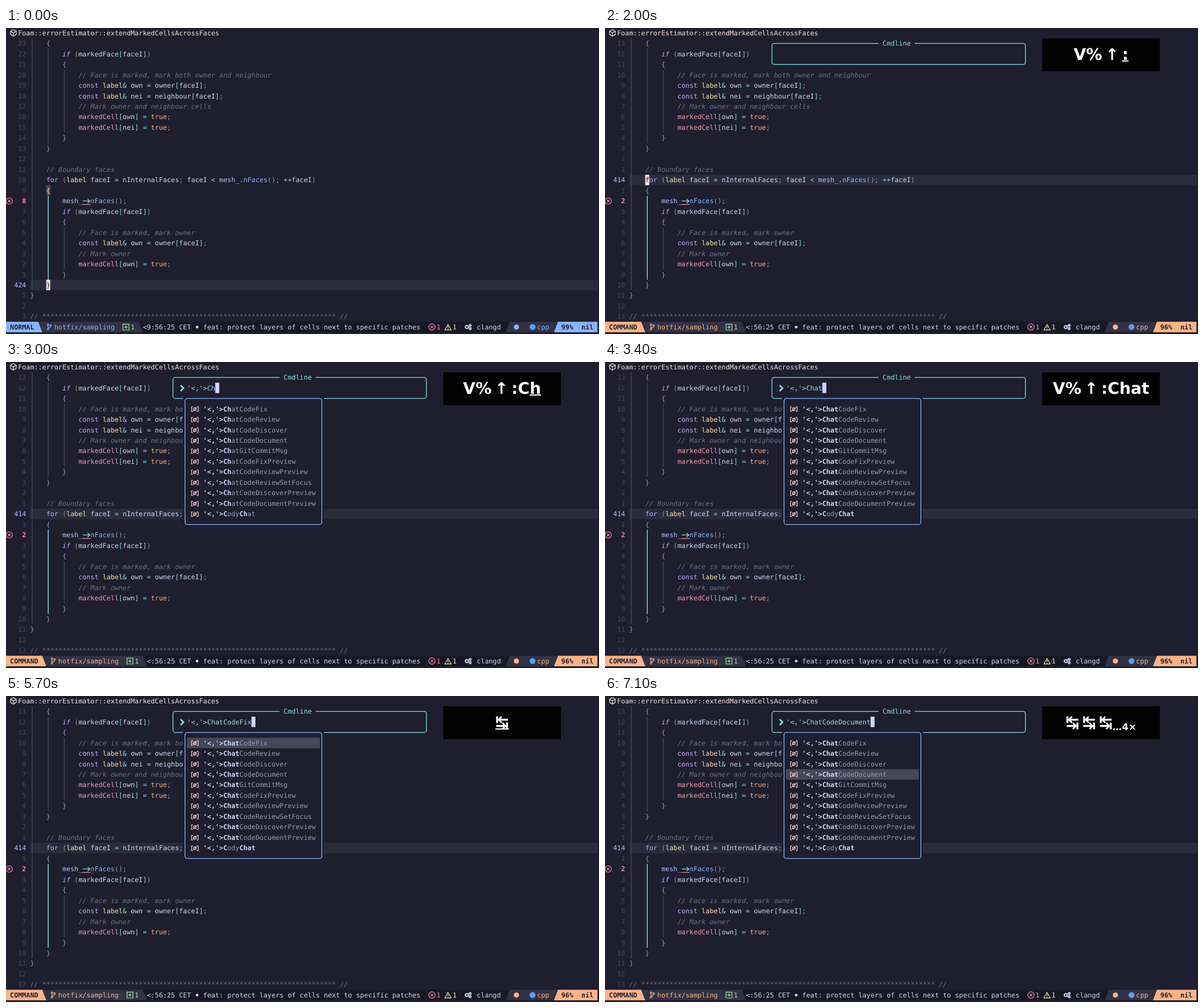
Animation, 1041 px wide and 538 px high, one loop 8 s. Source, as an HTML page with a canvas:

```html
<!DOCTYPE html>
<html lang="en">
<head>
<meta charset="utf-8">
<title>Editor session</title>
<style>
  html, body { margin: 0; width: 100%; height: 100%; overflow: hidden; background: #1e1e2e; }
  canvas { display: block; width: 1041px; height: 538px; }
</style>
</head>
<body>
<canvas id="stage"></canvas>
<script>
const W = 1041, H = 538, LOOP = 8000;
const CW = 7.063, LH = 18.47, TOP = -0.6;      // terminal cell grid
const MONO = `${CW / 0.60205}px "DejaVu Sans Mono", monospace`;
const KEYS = 'bold 28.2px "DejaVu Sans", sans-serif';
const SUB = 'bold 16.6px "DejaVu Sans", sans-serif';
const C = {
  base: '#1e1e2e', mantle: '#181825', surface0: '#313244', surface1: '#45475a',
  line: '#2a2b3c', overlay0: '#6c7086', overlay2: '#9399b2', text: '#cdd6f4',
  mauve: '#cba6f7', blue: '#89b4fa', red: '#f38ba8', maroon: '#eba0ac',
  peach: '#fab387', yellow: '#f9e2af', sky: '#89dceb', teal: '#94e2d5',
  green: '#a6e3a1', lavender: '#b4befe', rose: '#f5e0dc', pink: '#f2cdcd'
};
const MODE = { NORMAL: C.blue, 'V-LINE': C.mauve, COMMAND: C.peach };

const code = `    {
        if (markedFace[faceI])
        {
            // Face is marked, mark both owner and neighbour
            const label& own = owner[faceI];
            const label& nei = neighbour[faceI];
            // Mark owner and neighbour cells
            markedCell[own] = true;
            markedCell[nei] = true;
        }
    }

    // Boundary faces
    for (label faceI = nInternalFaces; faceI < mesh_.nFaces(); ++faceI)
    {
        mesh_->nFaces();
        if (markedFace[faceI])
        {
            // Face is marked, mark owner
            const label& own = owner[faceI];
            // Mark owner
            markedCell[own] = true;
        }
    }
}

// ${'*'.repeat(73)} //`.split('\n');

const rules = [
  [/^\/\/.*/, C.overlay0, 'italic'],
  [/^if\b/, C.mauve, 'italic'],
  [/^(const|for)\b/, C.mauve],
  [/^label\b/, C.yellow],
  [/^true\b/, C.peach],
  [/^markedCell\b/, C.maroon],
  [/^mesh_/, C.lavender],
  [/^nFaces\b/, C.blue],
  [/^(->|\+\+|[&=<.\[\]])/, C.sky],
  [/^[(){};]/, C.overlay2],
  [/^(\w+|\s+)/, C.text]
];

function tokenize(line) {
  const out = [];
  let col = 6;
  while (line) {
    const [re, color, style = ''] = rules.find(r => r[0].test(line));
    const text = line.match(re)[0];
    out.push({ text, col, color, style });
    col += text.length;
    line = line.slice(text.length);
  }
  return out;
}
const tokens = code.map(tokenize);

// column, first row, last row, colour
const guides = [
  [6, 1, 24, C.surface1], [10, 2, 10, C.surface1], [14, 4, 9, C.surface1],
  [10, 16, 23, C.sky], [14, 19, 22, C.surface1]
];

const chatItems = ('ChatCodeFix ChatCodeReview ChatCodeDiscover ChatCodeDocument ChatGitCommitMsg ' +
  'ChatCodeFixPreview ChatCodeReviewPreview ChatCodeReviewSetFocus ChatCodeDiscoverPreview ' +
  'ChatCodeDocumentPreview CodyChat').split(' ');
const allItems = ('CodyDo CSVLint CodyAsk Copilot CodyChat CodyTask CmpStatus Catppuccin CodyToggle ' +
  'ChatCodeFix CodyExplain CodyRestart ChatCodeReview ColorizerToggle ChatCodeDiscover ' +
  'ChatCodeDocument ChatGitCommitMsg CatppuccinCompile ChatCodeFixPreview ChatCodeReviewPreview ' +
  'ChatCodeReviewSetFocus CodyIgnoreNotification ChatCodeDiscoverPreview').split(' ');

// each step changes part of the state; `mark` underlines the latest key
const typed = 'V%\u2009↑\u2009:', tab = '↹', gap = '\u2009';
const steps = [
  [0, { cur: 424, mode: 'NORMAL', keys: '', sub: '', mark: 0, box: 0, cmd: null, query: '', pick: -1 }],
  [700, { mode: 'V-LINE', keys: 'V', mark: 1 }],
  [900, { mark: 0 }],
  [1100, { cur: 415, keys: 'V%', mark: 1 }],
  [1300, { mark: 0 }],
  [1600, { cur: 414, keys: 'V%\u2009↑', mark: 1 }],
  [1800, { mark: 0 }],
  [2000, { mode: 'COMMAND', keys: typed, mark: 1, box: 1 }],
  [2100, { cmd: '' }],
  [2200, { mark: 0 }],
  [2500, { cmd: 'C', query: 'C', keys: typed + 'C', mark: 1 }],
  [2900, { cmd: 'Ch', keys: typed + 'Ch' }],
  [3000, { query: 'Ch' }],
  [3100, { cmd: 'Cha', query: 'Cha', keys: typed + 'Cha' }],
  [3200, { cmd: 'Chat', keys: typed + 'Chat' }],
  [3300, { query: 'Chat' }],
  [3400, { mark: 0 }],
  [4400, { keys: '' }],
  [5700, { keys: tab, mark: 1, pick: 0 }],
  [5900, { keys: tab + gap + tab, pick: 1 }],
  [6100, { mark: 0 }],
  [6600, { keys: tab + gap + tab + gap + tab, mark: 1, pick: 2 }],
  [6800, { mark: 0 }],
  [6900, { sub: '…4×', mark: 1, pick: 3 }],
  [7100, { mark: 0 }]
];
const stateAt = t => Object.assign({}, ...steps.filter(s => s[0] <= t).map(s => s[1]));

const canvas = document.getElementById('stage');
const g = canvas.getContext('2d');
const dpr = window.devicePixelRatio || 1;
canvas.width = W * dpr;
canvas.height = H * dpr;
g.scale(dpr, dpr);
g.textRendering = 'geometricPrecision';

const px = col => col * CW;
const py = row => TOP + row * LH;
const mid = row => py(row) + LH / 2;

function fill(x, y, w, h, color) {
  g.fillStyle = color;
  g.fillRect(x, y, w, h);
}
function cells(col, row, cols, rows, color) {
  fill(px(col), py(row), cols * CW, rows * LH, color);
}
function put(text, col, row, color, style = '') {
  g.font = style + ' ' + MONO;
  g.fillStyle = color;
  [...text].forEach((ch, i) => {
    if (ch !== ' ') g.fillText(ch, px(col + i), py(row) + 13.3);
  });
}
function stroke(d, color, width = 1.1) {
  g.strokeStyle = color;
  g.lineWidth = width;
  g.stroke(new Path2D(d));
}
function disc(x, y, r, color) {
  g.fillStyle = color;
  g.beginPath();
  g.arc(x, y, r, 0, Math.PI * 2);
  g.fill();
}
function ring(x, y, r, color, width = 1.1) {
  g.strokeStyle = color;
  g.lineWidth = width;
  g.beginPath();
  g.arc(x, y, r, 0, Math.PI * 2);
  g.stroke();
}
function frame(c1, r1, c2, r2, color) {
  g.strokeStyle = color;
  g.lineWidth = 1.3;
  g.beginPath();
  g.roundRect(px(c1 + 0.5), mid(r1), px(c2 - c1), (r2 - r1) * LH, 4);
  g.stroke();
}
function poly(color, ...pts) {
  g.fillStyle = color;
  g.beginPath();
  pts.forEach(([x, y]) => g.lineTo(x, y));
  g.fill();
}

function errorIcon(x, y) {
  ring(x, y, 5.6, C.red, 1.2);
  stroke(`M${x - 2.3} ${y - 2.3}l4.6 4.6m0 -4.6l-4.6 4.6`, C.red, 1.2);
}
function gear(x, y, r) {
  ring(x, y, r, C.text, 1.6);
  for (let i = 0; i < 8; i++) {
    const a = i * Math.PI / 4;
    disc(x + Math.cos(a) * (r + 1), y + Math.sin(a) * (r + 1), 0.7, C.text);
  }
}

function drawHeader() {
  stroke('M13 2.8L18 5.7V11.3L13 14.2L8 11.3V5.7ZM8 5.7L13 8.6L18 5.7M13 8.6V14.2', C.rose, 1.2);
  put('Foam::errorEstimator::extendMarkedCellsAcrossFaces', 3, 0, C.rose);
}

function drawCode(s) {
  const cur = s.cur - 400, visual = s.mode === 'V-LINE';
  const match = { 424: 15, 415: 24 }[s.cur];
  const selected = row => visual && row >= cur && row <= 24;

  if (!visual) fill(px(6), py(cur), 1039 - px(6), LH, C.line);
  code.forEach((line, i) => {
    if (selected(i + 1)) cells(6, i + 1, line.length, 1, C.surface1);
  });
  for (const [col, r1, r2, color] of guides)
    fill(px(col + 0.5) - 0.7, py(r1), 1.4, (r2 - r1 + 1) * LH, color);

  tokens.forEach((list, i) => {
    const row = i + 1, bold = selected(row) ? 'bold ' : '';
    const error = row === 16;
    const num = row === cur ? s.cur : Math.abs(row - cur);
    put(String(num).padStart(3), 2, row,
      error ? C.red : row === cur ? C.lavender : C.surface1, error ? 'bold' : '');
    for (const k of list) {
      if (k.text === '->') {
        const x = px(k.col), y = mid(row);
        stroke(`M${x + 0.5} ${y}h12.5m-4 -3.8l4 3.8l-4 3.8`, k.color, bold ? 1.8 : 1.3);
        fill(x, y + 5.6, 2 * CW, 1.2, C.red);
      } else put(k.text, k.col, row, k.color, bold + k.style);
    }
  });
  errorIcon(5.6, mid(16));

  if (match) {
    cells(10, match, 1, 1, C.surface1);
    put(match === 15 ? '{' : '}', 10, match, C.peach, 'bold');
  }
  if (s.cmd === null) {
    cells(10, cur, 1, 1, C.rose);
    put(code[cur - 1][4], 10, cur, C.base, visual ? 'bold' : '');
  }
}

function drawStatus(s) {
  const color = MODE[s.mode], row = 28, y = py(row), b = y + LH, m = mid(row);
  const end = s.mode.length + 2, shift = end - 8;
  cells(0, row, 147, 1, C.mantle);

  const e = px(33 + shift);
  poly(C.surface0, [0, y], [e, y], [e + CW, b], [0, b]);
  poly(color, [0, y], [px(end), y], [px(end + 1), b], [0, b]);
  put(s.mode, 1, row, C.base, 'bold');

  const x = px(10 + shift);
  stroke(`M${x + 3} ${m - 3}v6M${x + 7.6} ${m - 1.5}q0 3 -4.6 3`, color, 1.2);
  ring(x + 3, m - 4, 1.4, color);
  ring(x + 3, m + 4, 1.4, color);
  ring(x + 7.6, m - 2.8, 1.4, color);
  put('hotfix/sampling', 12 + shift, row, color);

  const p = px(29 + shift) + 5.8;
  stroke(`M${p - 5.2} ${m - 5.2}h10.4v10.4h-10.4ZM${p - 3} ${m}h6M${p} ${m - 3}v6`, C.green, 1.2);
  put('1', 31 + shift, row, C.green);

  put(shift ? '<:56:25 CET' : '<9:56:25 CET', 34 + shift, row, C.text);
  disc(px(47.5), m, 2.4, C.text);
  put('feat: protect layers of cells next to specific patches', 49, row, C.text);

  errorIcon(747.8, m);
  put('1', 107, row, C.red);
  stroke(`M776 ${m - 4.6}l5.6 9.6h-11.2ZM776 ${m - 1.6}v3.4m0 1v1.2`, C.yellow, 1.2);
  put('1', 111, row, C.yellow);
  gear(809, m, 2.4);
  gear(814.8, m - 2.8, 1.3);
  gear(814.8, m + 2.8, 1.3);
  put('clangd', 117, row, C.text);

  const r = px(124.2), q = px(136.2);
  poly(C.surface0, [r + CW, y], [px(147), y], [px(147), b], [r, b]);
  poly(color, [q + CW, y], [px(147), y], [px(147), b], [q, b]);
  disc(896, m, 4.6, color);
  disc(924.3, m, 5.2, '#519fee');
  put('cpp', 132, row, color);
  put(Math.floor(s.cur / 427 * 100) + '%', 138, row, C.base, 'bold');
  put('nil', 143, row, C.base, 'bold');
}

function drawPrompt(s) {
  cells(41, 1, 64, 3, C.base);
  frame(41, 1, 104, 3, C.sky);
  cells(68, 1, 9, 1, C.base);
  put('Cmdline', 69, 1, C.sky);
  if (s.cmd === null) return;
  const cmd = s.pick < 0 ? s.cmd : chatItems[s.pick];
  stroke(`M306.5 ${mid(2) - 4.6}l5.2 5l-5.2 5`, C.sky, 2.6);
  put("'<,'>", 45, 2, C.text);
  put(cmd, 50, 2, C.teal);
  cells(50 + cmd.length, 2, 1, 1, C.text);
}

function drawMenu(s) {
  const wide = s.query === 'C', list = wide ? allItems : chatItems;
  const right = wide ? 80 : 78, last = list.length + 4;
  cells(44, 3, right - 43, last - 2, C.base);
  frame(44, 3, right, last, C.blue);
  if (wide) cells(80, 4, 1, 19, C.overlay0);
  list.forEach((name, i) => {
    const row = 4 + i, y = mid(row) + 0.4;
    if (i === s.pick) cells(45, row, 33, 1, C.surface1);
    stroke(`M328 ${y - 4}h-2.3v8h2.3M335 ${y - 4}h2.3v8h-2.3M328.6 ${y + 3.2}l5.8 -6.4`, C.pink, 1.2);
    ring(331.5, y, 2.5, C.pink, 1.2);
    put("'<,'>", 49, row, C.text, 'bold');
    put(name, 54, row, C.overlay2);
    const at = name.indexOf(s.query);
    const hits = at >= 0 && !(name === 'CodyChat' && wide) ? [[at, s.query]] : [[0, 'C']];
    if (name === 'CodyChat' && !wide) hits.push([0, 'C']);
    for (const [pos, part] of hits) {
      cells(54 + pos, row, part.length, 1, i === s.pick ? C.surface1 : C.base);
      put(part, 54 + pos, row, C.text, 'bold');
    }
  });
}

function drawKeys(s) {
  fill(767.5, 18, 206.5, 58, '#030304');
  const width = (text, font) => (g.font = font, g.measureText(text).width);
  const main = width(s.keys, KEYS), sub = width(s.sub, SUB);
  const x = 870.8 - (main + sub) / 2;
  g.fillStyle = '#fff';
  g.font = KEYS;
  g.fillText(s.keys, x, 56);
  g.font = SUB;
  g.fillText(s.sub, x + main, 59.5);
  if (!s.mark) return;
  if (s.sub) return fill(x + main, 60, sub, 2, '#fff');
  const before = width(s.keys.slice(0, -1), KEYS);
  fill(x + before, 57, main - before, 2, '#fff');
}

function draw(s) {
  fill(0, 0, W, H, C.base);
  drawHeader();
  drawCode(s);
  drawStatus(s);
  if (s.box) drawPrompt(s);
  if (s.query) drawMenu(s);
  if (s.keys) drawKeys(s);
}

const start = performance.now();
function tick() {
  draw(stateAt((performance.now() - start) % LOOP));
  requestAnimationFrame(tick);
}
tick();
</script>
</body>
</html>
```
